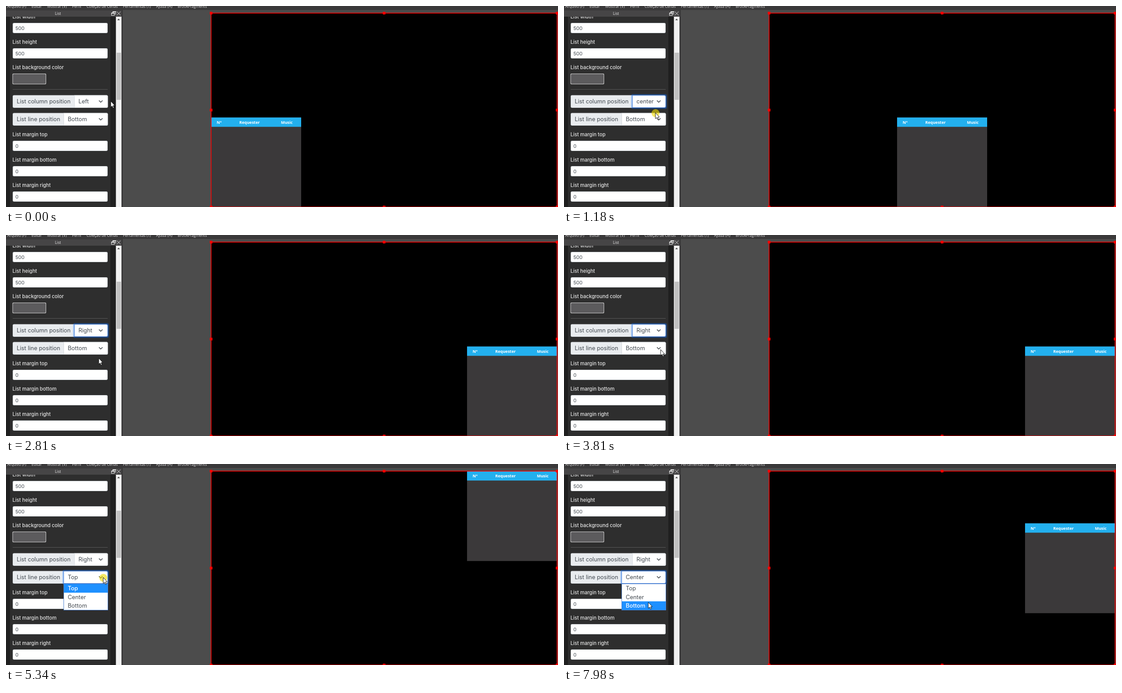
These frames come from a looping animation (1238 px wide and 452 px high, 8 s). An HTML page with a canvas:

```html
<!DOCTYPE html>
<html lang="en">
<head>
<meta charset="utf-8">
<title>List position settings</title>
<style>
  html, body { margin: 0; width: 100%; height: 100%; overflow: hidden; background: #4c4c4c; }
  canvas { display: block; }
</style>
</head>
<body>
<canvas id="stage" width="1238" height="452"></canvas>
<script>
const ctx = document.getElementById('stage').getContext('2d');
const LOOP = 8000, STEP = 78, ROW = 57, OPTION = 19.4;
const FORM = 'Inter, sans-serif';
const APP = '"Open Sans", "Noto Sans", sans-serif';
const INK = '#434a51', EDGE = '#d5dade', DARK = '#464546';

const COLUMN = { label: 'List column position', x: 153, y: 200.5, options: ['Left', 'center', 'Right'], first: 0 };
const LINE = { label: 'List line position', x: 129, y: 240.5, options: ['Top', 'Center', 'Bottom'], first: 2 };

// Each round: walk to the select, press it, walk to an option, pick it
const ROUNDS = [
  { field: COLUMN, choice: 1, spot: [205, 240], go: 90, press: 481, leave: 790, hover: 940, pick: 1110, done: 1180 },
  { field: COLUMN, choice: 2, spot: [208, 277], go: 1500, press: 2014, leave: 2270, hover: 2580, pick: 2730, done: 2810 },
  { field: LINE, choice: 0, spot: [192.5, 283], go: 3040, press: 3960, leave: 4190, hover: 4500, pick: 4650, done: 4730 },
  { field: LINE, choice: 1, spot: [188, 301], go: 5030, press: 5340, leave: 5500, hover: 5810, pick: 6270, done: 6420 },
  { field: LINE, choice: 2, spot: [189, 311], go: 6740, press: 7050, leave: 7200, hover: 7810, pick: LOOP, done: LOOP }
];

const clicked = (t, at) => t >= at && t < at + STEP;
const isOpen = (r, t) => t >= r.press && t < r.done;
const focusAt = t => ROUNDS.filter(r => r.press - STEP <= t).pop()?.field;

function valueAt(field, t) {
  const last = ROUNDS.filter(r => r.field === field && r.done <= t).pop();
  return last ? last.choice : field.first;
}

function walk(from, to, t, start, end) {
  const begin = start - STEP;
  const time = Math.floor((t - begin + 2) / STEP) * STEP;
  const u = t >= end ? 1 : Math.max(0, Math.min(1, time / (end - begin)));
  const e = u * u * (3 - 2 * u);
  return from.map((v, i) => v + (to[i] - v) * e);
}

function pointerAt(t) {
  let p = [235, 214];
  for (const r of ROUNDS) {
    p = walk(p, [218, r.field.y + 14.5], t, r.go, r.press);
    p = walk(p, r.spot, t, r.leave, r.hover);
  }
  return p;
}

function rect(x, y, w, h, fill) {
  ctx.fillStyle = fill;
  ctx.fillRect(x, y, w, h);
}

// Rounded box whose border lies inside its bounds
function box(x, y, w, h, r, fill, edge) {
  ctx.beginPath();
  ctx.roundRect(x, y, w, h, r);
  ctx.fillStyle = edge || fill;
  ctx.fill();
  if (!edge) return;
  ctx.beginPath();
  ctx.roundRect(x + 1, y + 1, w - 2, h - 2, r);
  ctx.fillStyle = fill;
  ctx.fill();
}

function path(points, { fill, line, width = 1, closed = false }) {
  ctx.beginPath();
  points.forEach(p => ctx.lineTo(...p));
  if (closed) ctx.closePath();
  if (fill) { ctx.fillStyle = fill; ctx.fill(); }
  if (line) { ctx.strokeStyle = line; ctx.lineWidth = width; ctx.stroke(); }
}

function text(s, x, y, font, fill, align = 'left') {
  ctx.font = font;
  ctx.fillStyle = fill;
  ctx.textAlign = align;
  ctx.fillText(s, x, y);
}

function miniWindow(x, y) {
  box(x, y, 7.5, 6.5, 0, DARK, '#f0f0f0');
  rect(x, y, 7.5, 2, '#f0f0f0');
}

function drawWindow() {
  rect(0, 0, 1238, 452, '#4c4c4c');
  rect(0, 0, 1238, 9, '#3a393a');
  let x = 3;
  for (const s of ['Arquivo (F)', 'Editar', 'Mostrar (V)', 'Perfil', 'Coleção de Cenas',
    'Ferramentas (T)', 'Ajuda (H)', 'BrookFragments']) {
    text(s, x, 4, '8.5px ' + APP, '#e1e0e1');
    x += ctx.measureText(s).width + 12;
  }

  rect(0, 9, 262, 443, '#3a393a');
  rect(0, 10, 259, 14, DARK);
  text('List', 116.5, 19.5, '8.5px ' + APP, '#e8e8e8', 'center');
  miniWindow(239, 12);
  miniWindow(236, 15);
  path([[248.5, 12.5], [257, 21]], { line: '#d8d8d8' });
  path([[257, 12.5], [248.5, 21]], { line: '#d8d8d8' });

  rect(0, 24, 247, 428, '#1f1f1f');
  rect(9, 24, 225, 428, '#2e2e2e');
  rect(246.5, 24, 12.5, 428, '#f1f1f1');
  rect(248, 105, 10, 106, '#c1c1c1');
  path([[249.5, 32], [252.5, 28.5], [255.5, 32]], { fill: '#505050' });
}

function drawGroup(names, y, value) {
  names.forEach((name, i) => {
    const mid = y + i * ROW;
    text(name, 14.5, mid + 4, '500 11.1px ' + FORM, '#e6e6e6');
    if (name.endsWith('color')) return box(14.5, mid + 14.5, 75.5, 24, 2, '#5c5b5d', '#d4d4d4');
    box(15, mid + 14.5, 213, 23, 3, '#fff', EDGE);
    text(value, 21, mid + 30, '11px ' + FORM, INK);
  });
}

function drawForm() {
  ctx.save();
  ctx.beginPath();
  ctx.rect(0, 24, 246, 428);
  ctx.clip();
  drawGroup(['List width', 'List height', 'List background color'], 23.5, '500');
  rect(15, 187, 213, 1, '#5a5a5a');
  drawGroup(['List margin top', 'List margin bottom', 'List margin right'], 288.5, '0');
  ctx.restore();
}

function drawSelect(field, t) {
  const { x, y } = field, w = 228.5 - x, h = 28.5;
  const focused = focusAt(t) === field;
  box(15, y, 213.5, h, 3, '#e9ecef', EDGE);
  text(field.label, 24, y + 18.5, '12.8px ' + FORM, INK);
  if (focused) box(x - 2.5, y - 2.5, w + 5, h + 5, 4, 'rgba(0,105,255,.32)');
  box(x, y, w, h, [0, 3, 3, 0], '#fff', focused ? '#4b82d8' : EDGE);
  text(field.options[valueAt(field, t)], x + 9.5, y + 18.5, '12.8px ' + FORM, INK);
  path([[208.5, y + 12], [212.5, y + 16], [216.5, y + 12]], { line: '#343a40', width: 1.5 });
}

function drawOptions(t) {
  const r = ROUNDS.find(r => isOpen(r, t));
  if (!r) return;
  const { x, y, options } = r.field, w = 229 - x, top = y + 28.5;
  box(x, top, w, 60, 0, '#fff', '#4a7fd0');
  const active = t >= r.hover ? r.choice : valueAt(r.field, t);
  options.forEach((s, i) => {
    const on = i === active, oy = top + 1 + i * OPTION;
    if (on) rect(x + 1, oy, w - 2, OPTION, '#1e90ff');
    text(s, x + 9.5, oy + 14.3, (on ? '500 ' : '') + '12.8px ' + FORM, on ? '#fff' : INK);
  });
}

function drawScene(t) {
  rect(460, 16, 776, 436, '#000');
  const size = 202;
  const x = 460 + (776 - size) / 2 * valueAt(COLUMN, t);
  const y = 16.2 + (436.5 - size) / 2 * valueAt(LINE, t);
  rect(x, y, size, size, '#3b393a');
  rect(x, y, size, 21, '#23b0ee');
  ['Nº', 'Requester', 'Music'].forEach((s, i) =>
    text(s, x + 18 + i * (60.5 + i * 7.7), y + 14.2, '700 9px ' + APP, '#fff', 'center'));

  ctx.strokeStyle = '#f00';
  ctx.lineWidth = 1.6;
  ctx.strokeRect(460, 16, 776, 436);
  for (let i = 0; i < 9; i++) {
    if (i === 4) continue;
    rect(457 + (i % 3) * 388, 13 + Math.floor(i / 3) * 218, 6, 6, '#f00');
  }
}

function drawPointer(t) {
  const [x, y] = pointerAt(t);
  if (ROUNDS.some(r => clicked(t, r.press) || clicked(t, r.pick))) {
    ctx.beginPath();
    ctx.arc(x + 0.3, y + 1, 9, 0, Math.PI * 2);
    ctx.fillStyle = 'rgba(240,220,0,.6)';
    ctx.fill();
  }
  const arrow = [[0, 0], [0, 13.5], [3.1, 10.8], [5.2, 15.7], [7.3, 14.8], [5.2, 10.1], [9, 9.8]];
  path(arrow.map(([dx, dy]) => [x + dx, y + dy]), { fill: '#fff', line: '#000', width: 0.9, closed: true });
}

function draw(t) {
  drawWindow();
  drawForm();
  drawSelect(COLUMN, t);
  drawSelect(LINE, t);
  drawOptions(t);
  drawScene(t);
  drawPointer(t);
}

const begin = performance.now();
function tick() {
  draw((performance.now() - begin) % LOOP);
  requestAnimationFrame(tick);
}
tick();
</script>
</body>
</html>
```
